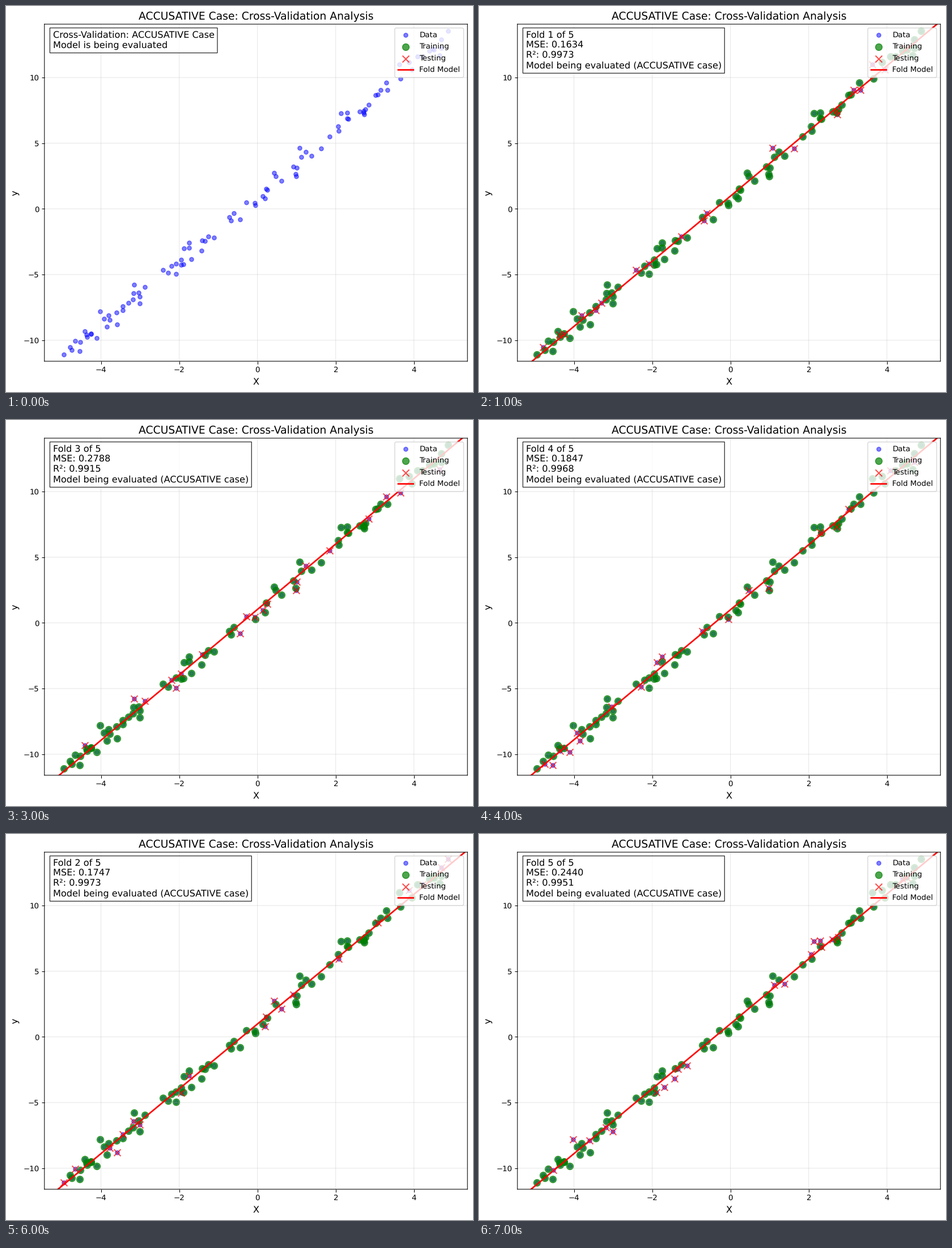
Recreate the animation shown at these times as a matplotlib script. Size 824 by 680 pixels, loop 8 s.

```python
import numpy as np
import matplotlib.pyplot as plt
from matplotlib.animation import FuncAnimation

W, H, DPI = 824, 680, 96
BASE = 10.04  # base font size in points
FOLDS = 5
STEPS = [0, 1, 0, 3, 4, 5, 2, 5]  # 0 shows the plain data, others a fold

# Noisy straight line
np.random.seed(42)
x = np.random.rand(100) * 10 - 5
y = 2.5 * x + 1 + np.random.randn(100) * 0.5

# Shuffled test groups
order = np.arange(len(x))
np.random.RandomState(42).shuffle(order)
groups = [np.sort(g) for g in np.split(order, FOLDS)]

# Soft, unsnapped edges and letters
plt.rcParams.update({
    "font.family": "DejaVu Sans",
    "font.size": BASE,
    "text.hinting": "no_hinting",
    "path.snap": False,
})
fig = plt.figure(figsize=(W / DPI, H / DPI), dpi=DPI)
left, right, top, bottom = 67.8, 814.2, 32, 625.8
ax = fig.add_axes([left / W, 1 - bottom / H, (right - left) / W, (bottom - top) / H])
ax.set_xlim(x.min() - 0.5, x.max() + 0.5)
ax.set_ylim(y.min() - 0.5, y.max() + 0.5)
ax.set_title("ACCUSATIVE Case: Cross-Validation Analysis", fontsize=1.4 * BASE)
ax.set_xlabel("X", fontsize=1.2 * BASE, labelpad=5)
ax.set_ylabel("y", fontsize=1.2 * BASE)
ax.grid(True, alpha=0.3)

ax.scatter(x, y, s=30, c="blue", alpha=0.5, label="Data")
train_dots = ax.scatter([], [], s=80, c="green", alpha=0.7, label="Training")
test_dots = ax.scatter([], [], s=80, c="red", marker="x", alpha=0.7, label="Testing")
line, = ax.plot([], [], "r-", lw=2, label="Fold Model")
ax.legend(loc="upper right", fontsize=BASE, labelspacing=0.62, borderpad=0.45)
note = ax.text(0.02, 0.98, "", transform=ax.transAxes, fontsize=1.2 * BASE, va="top",
               bbox=dict(facecolor="white", alpha=0.8))


def show_points(dots, idx):
    dots.set_offsets(np.column_stack([x[idx], y[idx]]))


def show_data():
    none = np.array([], dtype=int)
    show_points(train_dots, none)
    show_points(test_dots, none)
    line.set_data([], [])
    note.set_text("Cross-Validation: ACCUSATIVE Case\nModel is being evaluated")


def show_fold(fold):
    test = groups[fold - 1]
    train = np.setdiff1d(order, test)
    slope, base = np.polyfit(x[train], y[train], 1)
    error = y[test] - (slope * x[test] + base)
    mse = np.mean(error ** 2)
    r2 = 1 - mse / np.var(y[test])

    show_points(train_dots, train)
    show_points(test_dots, test)
    ends = np.array(ax.get_xlim())
    line.set_data(ends, slope * ends + base)
    note.set_text(f"Fold {fold} of {FOLDS}\nMSE: {mse:.4f}\nR²: {r2:.4f}\n"
                  "Model being evaluated (ACCUSATIVE case)")


def update(i):
    fold = STEPS[i]
    if fold:
        show_fold(fold)
    else:
        show_data()
    return train_dots, test_dots, line, note


anim = FuncAnimation(fig, update, frames=len(STEPS), interval=1000,
                     init_func=lambda: update(0), repeat=True, repeat_delay=0)
plt.show()
```
